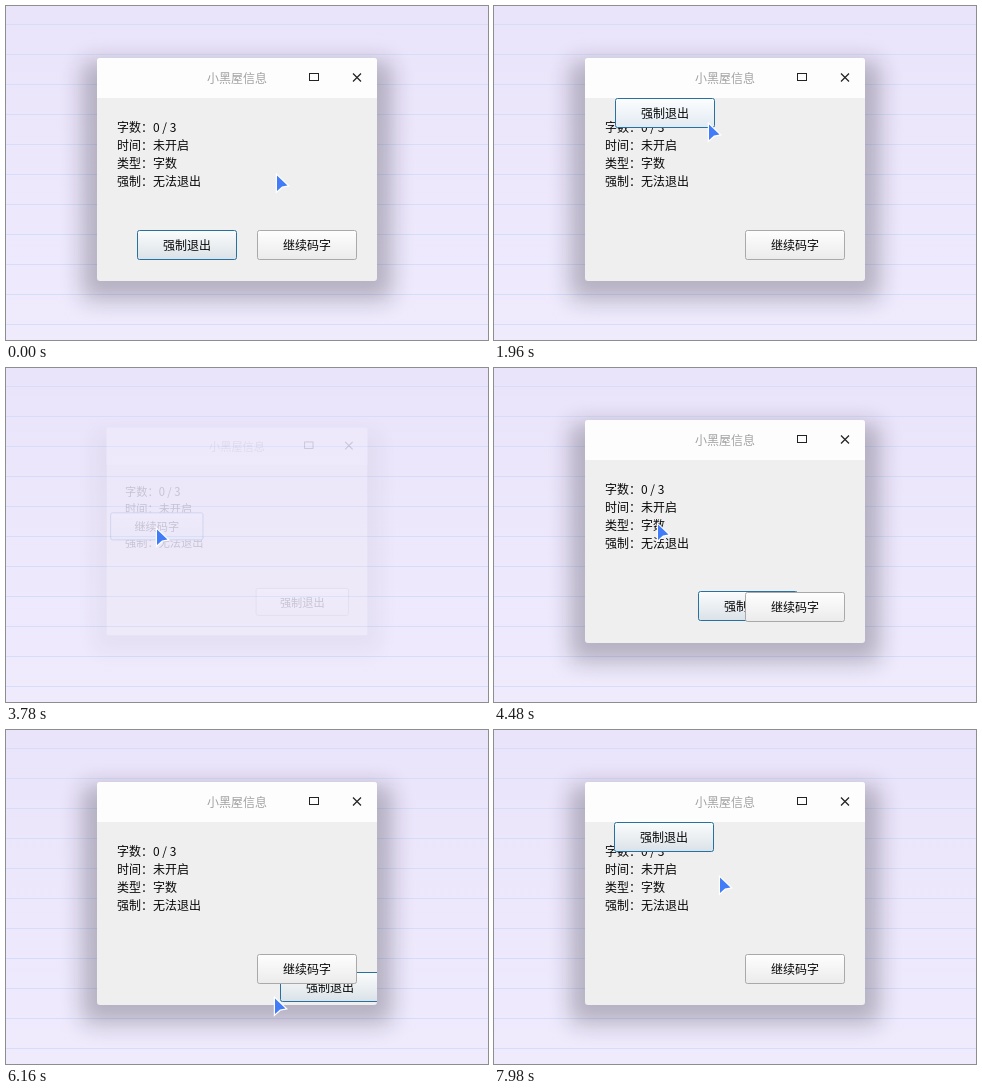
Animation of 482x334 px, one loop 8 s. Source, as an HTML page:

```html
<!DOCTYPE html>
<html lang="zh-CN">
<head>
<meta charset="utf-8">
<title>小黑屋信息</title>
<style>
  html, body { margin: 0; width: 100%; height: 100%; overflow: hidden; }
  svg { display: block; width: 482px; height: 334px; }
  text { font: 12px "Noto Sans CJK SC", "Noto Sans CJK", sans-serif; fill: #080808; white-space: pre; }
  .title { fill: #a2a2a2; }
  .mid { text-anchor: middle; }
  .icon { fill: none; stroke: #222; }
</style>
</head>
<body>
<svg viewBox="0 0 482 334">
  <defs>
    <linearGradient id="paper" x2="0" y2="1">
      <stop stop-color="#eae4fa"/><stop offset="1" stop-color="#efebfd"/>
    </linearGradient>
    <linearGradient id="plain" x2="0" y2="1">
      <stop stop-color="#fefefe"/><stop offset="1" stop-color="#ebebeb"/>
    </linearGradient>
    <linearGradient id="focus" x2="0" y2="1">
      <stop stop-color="#fbfcfc"/><stop offset="1" stop-color="#dae2e8"/>
    </linearGradient>
    <linearGradient id="hover" x2="0" y2="1">
      <stop stop-color="#fcfdfe"/><stop offset="1" stop-color="#e1ebf3"/>
    </linearGradient>
    <filter id="blur" x="-20%" y="-20%" width="140%" height="140%">
      <feGaussianBlur stdDeviation="11"/>
    </filter>
    <clipPath id="frame"><rect x="91" y="52" width="280" height="223" rx="3"/></clipPath>
    <clipPath id="body"><path d="M91 92h280v179a3 3 0 0 1-3 3h-274a3 3 0 0 1-3-3z"/></clipPath>
  </defs>
  <rect width="482" height="334" fill="url(#paper)"/>
  <g id="rules" stroke="#d5ddfb"></g>

  <g id="win">
    <rect x="76" y="55" width="310" height="239" rx="8" fill="#1c1628" opacity=".27" filter="url(#blur)"/>
    <g clip-path="url(#frame)">
      <rect x="91" y="52" width="280" height="223" fill="#efefef"/>
      <rect x="91" y="52" width="280" height="40" fill="#fdfdfd"/>
    </g>
    <text class="title mid" x="231" y="77">小黑屋信息</text>
    <rect class="icon" x="303.5" y="67.5" width="9" height="7"/>
    <path class="icon" d="M347 67.5l8 8m0-8l-8 8" stroke-width="1.2"/>
    <g id="info"></g>
    <g clip-path="url(#body)">
      <g id="runner">
        <rect id="skin" x=".5" y=".5" width="99" height="29" rx="2" stroke="#2671a0"/>
        <text id="runnerText" class="mid" x="50" y="20"></text>
      </g>
      <g transform="translate(251 224)">
        <rect x=".5" y=".5" width="99" height="29" rx="2" fill="url(#plain)" stroke="#a9a9a9"/>
        <text id="fixedText" class="mid" x="50" y="20"></text>
      </g>
    </g>
  </g>
  <path id="pointer" d="M1 1.500L11.500 11.500 6 12.500 1 17z" fill="#437cf8" stroke="#fff" stroke-width="2.400" paint-order="stroke"/>
</svg>
<script>
const LOOP = 8000, STEP = 70, HOP = 2 * STEP, REST = 3 * STEP;
const SWAP = 1960, REOPEN = 3900, FADE = 280;
const QUIT = '强制退出', STAY = '继续码字';
const $ = id => document.getElementById(id);

// Each touch: time, pointer x y, then the place the button flees to
const touches = [
  [70, 270, 168, 131, 224],
  [910, 229, 226, 255, 186],
  [1330, 256, 187, 121, 92],
  [SWAP, 214, 117, 95, 143],
  [2450, 150, 160, 95, 143],
  [REOPEN, 150, 160, 204, 223],
  [4340, 163, 155, 204, 223],
  [4900, 212, 238, 141, 136],
  [5320, 186, 146, 274, 242],
  [6160, 268, 267, 131, 172],
  [6580, 222, 190, 41, 255],
  [7070, 133, 257, 236, 143],
  [7560, 294, 150, 120, 92],
  [7980, 225, 146, 120, 92]
].map(([t, x, y, bx, by]) => ({ t, hand: [x, y], button: [bx, by] }));

const clamp = v => Math.max(0, Math.min(1, v));
const smooth = v => v * v * (3 - 2 * v);
const mix = (a, b, k) => a.map((v, i) => Math.round(v + (b[i] - v) * k));

// The button hops away at a touch; the pointer rests, then glides to the next one.
function pose(t) {
  const i = Math.max(0, touches.findLastIndex(p => p.t <= t));
  const last = touches[i], before = touches[i - 1] || last, next = touches[i + 1] || last;
  const glide = clamp((t - last.t - REST) / (next.t - last.t - REST || 1));
  const hop = smooth(clamp((t - last.t) / HOP));
  return { hand: mix(last.hand, next.hand, glide), button: mix(before.button, last.button, hop) };
}

function windowShown(t) {
  const closing = clamp((t - REOPEN + 330) / FADE), opening = clamp((t - REOPEN - 90) / FADE);
  return smooth(t < REOPEN ? 1 - closing : opening);
}

function draw(now) {
  const t = Math.floor((now % LOOP) / STEP) * STEP;
  const { hand: [px, py], button: [bx, by] } = pose(t);
  const over = px >= bx && px < bx + 100 && py >= by && py < by + 30;
  const swapped = t > SWAP && t < REOPEN;
  const shown = windowShown(t), scale = 0.92 + 0.08 * shown;

  $('pointer').setAttribute('transform', `translate(${px} ${py})`);
  $('runner').setAttribute('transform', `translate(${bx} ${by})`);
  $('skin').setAttribute('fill', `url(#${over ? 'hover' : 'focus'})`);
  $('runnerText').textContent = swapped ? STAY : QUIT;
  $('fixedText').textContent = swapped ? QUIT : STAY;
  $('win').setAttribute('opacity', shown);
  $('win').setAttribute('transform', `translate(231 163) scale(${scale}) translate(-231 -163)`);
}

for (let y = 18.5; y < 334; y += 30) $('rules').innerHTML += `<path d="M0 ${y}H482"/>`;
[['字数', '0 / 3'], ['时间', '未开启'], ['类型', '字数'], ['强制', '无法退出']].forEach((pair, i) => {
  $('info').innerHTML += `<text x="111" y="${126 + 18 * i}">${pair.join('\uff1a')}</text>`;
});

const begin = performance.now();
function tick() {
  draw(performance.now() - begin);
  requestAnimationFrame(tick);
}
tick();
</script>
</body>
</html>
```
